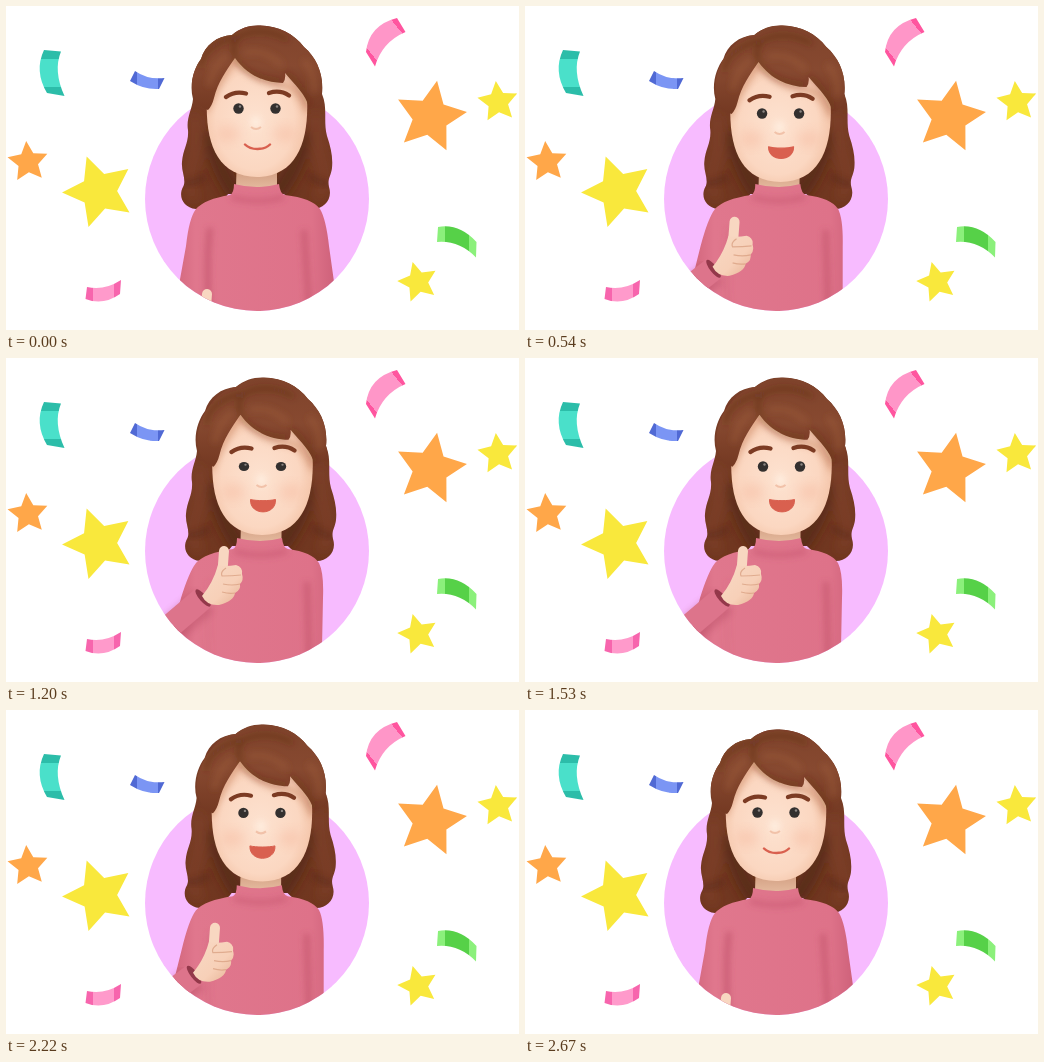
An HTML page for the animation above (2700 ms loop, 513 by 324 pixels).

```html
<!DOCTYPE html>
<html lang="en">
<head>
<meta charset="utf-8">
<title>Thumbs up</title>
<style>
html, body { margin: 0; width: 100%; height: 100%; overflow: hidden; background: #fff; }
svg { display: block; width: 513px; height: 324px; }
</style>
</head>
<body>
<svg viewBox="0 0 513 324" xmlns="http://www.w3.org/2000/svg">
  <defs>
    <clipPath id="disc"><circle cx="251" cy="193" r="112"/></clipPath>
    <filter id="soft" x="-50%" y="-50%" width="200%" height="200%"><feGaussianBlur stdDeviation="3"/></filter>
    <filter id="softer" x="-50%" y="-50%" width="200%" height="200%"><feGaussianBlur stdDeviation="6"/></filter>
    <linearGradient id="hair" x2="0" y2="1">
      <stop stop-color="#7b4029"/><stop offset="1" stop-color="#70361f"/>
    </linearGradient>
    <linearGradient id="fringe" x2="0" y2="1">
      <stop stop-color="#7f432b"/><stop offset=".5" stop-color="#874930"/><stop offset="1" stop-color="#743922"/>
    </linearGradient>
    <radialGradient id="skin" cx=".48" cy=".55" r=".6">
      <stop stop-color="#fde2d0"/><stop offset=".65" stop-color="#fbd7c1"/><stop offset="1" stop-color="#f0bb9c"/>
    </radialGradient>
    <linearGradient id="neckSkin" x2="0" y2="1">
      <stop offset=".3" stop-color="#cf9a7d"/><stop offset="1" stop-color="#e9c0a5"/>
    </linearGradient>
    <linearGradient id="wool" gradientUnits="userSpaceOnUse" x1="170" x2="330">
      <stop stop-color="#d4687f"/><stop offset=".12" stop-color="#e0778d"/>
      <stop offset=".85" stop-color="#de7289"/><stop offset="1" stop-color="#cd6079"/>
    </linearGradient>
    <linearGradient id="palm" x2="1" y2="1">
      <stop stop-color="#f8d9c4"/><stop offset=".6" stop-color="#f7d0b8"/><stop offset="1" stop-color="#e5b092"/>
    </linearGradient>
    <clipPath id="hairClip"><use href="#hairShape"/></clipPath>
    <clipPath id="faceClip"><use href="#faceShape"/></clipPath>
  </defs>

  <g id="confetti"></g>
  <circle cx="251" cy="193" r="112" fill="#f7bbff"/>

  <g id="backHair">
    <path id="hairShape" fill="url(#hair)" d="M254 19.5C273 20 288 28 298 41C311 52 318 69 316 88C322 102 317 115 321 130C325 142 327 151 326 162C325 170 321 173 323 181C327 193 318 203 307 203C296 203 286 196 278 188H222C216 197 202 205 190 203C177 202 172 190 177 181C181 174 175 166 176 156C177 143 183 137 182 124C180 112 186 104 187 93C183 78 188 62 195 53C199 39 211 30 226 29C234 22 244 19 254 19.5Z"/>
    <g clip-path="url(#hairClip)" fill="none">
      <g filter="url(#softer)">
        <path d="M205 125Q212 165 232 190H268Q291 165 298 125" stroke="#4e2214" stroke-width="17" opacity=".65"/>
        <path d="M188 110Q193 135 186 158T190 194M310 108Q309 132 316 156T311 192" stroke="#8f4e33" stroke-width="6" opacity=".6"/>
      </g>
      <path d="M177 177Q190 178 199 170M323 178Q313 178 303 169" stroke="#53261a" stroke-width="5" opacity=".55" filter="url(#soft)"/>
    </g>
  </g>

  <g clip-path="url(#disc)">
    <path id="neck" d="M231 150H271V180Q251 194 230 180Z" fill="url(#neckSkin)"/>
    <path id="body" fill="url(#wool)"/>
    <g fill="none" stroke="#b8485f" stroke-width="5" filter="url(#soft)">
      <path id="leftCrease" d="M204 222Q200 255 203 305"/>
      <path id="rightCrease" opacity=".55"/>
      <path id="collar" d="M225 191Q251 199 278 191" opacity=".4"/>
    </g>
    <path id="armShade" fill="none" stroke="#a94059" stroke-width="29" opacity=".3" filter="url(#soft)"/>
    <path id="forearm" fill="none" stroke="#dd748b" stroke-width="24"/>
    <ellipse id="cuff" rx="3.5" ry="11" fill="#93384a"/>
    <g id="hand">
      <path d="M218 193L216.5 213" stroke="#f8d7c1" stroke-width="10" stroke-linecap="round"/>
      <path d="M212 207Q219 209 230 207Q237 209 236 216Q238 222 234 226Q235 232 229 235Q228 243 213 247Q201 248 196 238Q207 225 212 207Z" fill="url(#palm)"/>
      <path d="M220 210Q214 214 216 218Q226 218 235 217M217 226Q226 228 234 226M216 234Q223 236 229 235" fill="none" stroke="#d99f80" stroke-width="1.2" opacity=".75"/>
    </g>
  </g>

  <g id="face">
    <path id="faceShape" fill="url(#skin)" d="M201 94C199 136 211 171 251 171C290 171 303 136 301 94C298 62 280 47 251 47C222 47 204 62 201 94Z"/>
    <path d="M199 105Q211 76 229 52Q246 76 281 80Q292 82 302 106" clip-path="url(#faceClip)" fill="none" stroke="#c98562" stroke-width="7" opacity=".5" filter="url(#soft)"/>
    <g filter="url(#softer)" fill="#f4ad91" opacity=".35"><ellipse cx="222" cy="128" rx="12" ry="8"/><ellipse cx="279" cy="128" rx="12" ry="8"/></g>
    <ellipse cx="250" cy="116" rx="5" ry="6" fill="#fff0e2" opacity=".8" filter="url(#soft)"/>
    <path d="M245 121Q250 125 255 121" fill="none" stroke="#e9ac8d" stroke-width="2" opacity=".6"/>
    <path id="brows" d="M220 91Q229 84.5 240 87.5M263 87Q274 83.5 283 89.5" fill="none" stroke="#7c3b23" stroke-width="4.2" stroke-linecap="round"/>
    <g id="eyes">
      <g fill="#33302f"><circle cx="232.5" cy="102.5" r="5.2"/><circle cx="269.5" cy="102.5" r="5.2"/></g>
      <g fill="#8b8683"><circle cx="234" cy="100.5" r="1.2"/><circle cx="271" cy="100.5" r="1.2"/></g>
    </g>
    <path id="mouth" fill="#d9604f" stroke="#d9604f" stroke-linejoin="round"/>
  </g>

  <g id="cap" clip-path="url(#hairClip)">
    <g id="fringeGroup">
      <path fill="url(#fringe)" d="M229 52C220 65 212 76 208 92Q206 100 202 104C195 102 188 94 186 82C184 60 199 30 228 22C252 8 286 15 304 45C319 62 318 84 313 95Q309 101 303 101C299 88 291 81 279 67Q280 73 277 77C259 77 241 69 229 52Z"/>
      <g fill="none" filter="url(#soft)">
        <path d="M195 62Q196 39 230 31M229 51Q224 39 234 30Q258 20 282 34" stroke="#55291b" stroke-width="3.5" opacity=".5"/>
        <path d="M238 47Q258 42 276 59M203 80Q207 60 221 49M298 54Q310 69 308 87" stroke="#a0603f" stroke-width="5" opacity=".5"/>
        <path d="M279 66Q293 74 303 99M229 53Q245 73 276 75" stroke="#58291a" stroke-width="3" opacity=".45"/>
      </g>
    </g>
  </g>
</svg>
<script>
const $ = id => document.getElementById(id);
const set = (id, name, value) => $(id).setAttribute(name, value);
const LOOP = 2700, STEP = 30;
let scenery = "";

function star(x, y, r, tilt, fill) {
  let points = "";
  for (let i = 0; i < 10; i++) {
    const a = (tilt + i * 36) * Math.PI / 180, d = i % 2 ? r * 0.49 : r;
    points += `${x + d * Math.sin(a)},${y - d * Math.cos(a)} `;
  }
  scenery += `<polygon points="${points}" fill="${fill}"/>`;
}

// A curved strip whose two ends carry a second colour.
function ribbon(id, axis, d, middle, ends) {
  const stop = (offset, color) => `<stop offset="${offset}" stop-color="${color}"/>`;
  scenery += `<linearGradient id="${id}" ${axis}>`
    + stop(0.2, ends) + stop(0.2, middle) + stop(0.8, middle) + stop(0.8, ends)
    + `</linearGradient><path d="${d}" fill="url(#${id})"/>`;
}

const across = 'x2="1" y2="0"', down = 'x2="0" y2="1"', slant = 'x1="1" x2="0" y2="1"';
star(424.5, 111, 36.8, 10.3, "#ffa749");
star(492, 96, 21, -6, "#f9e83c");
star(22, 156, 21, -5, "#ffa749");
star(93, 185.5, 37, -19.5, "#f9e83c");
star(412, 276, 20.8, -15, "#f9e83c");
ribbon("teal", down, "M38 44L55 45.5Q47 65 58.5 90L41 87Q28 65 38 44Z", "#4ae0ca", "#2cbda9");
ribbon("blue", across, "M129 65Q142 74 158.5 72L153 83Q138 84 124 75Z", "#7b95f4", "#5069d4");
ribbon("rose", slant, "M391 12Q363 19 360 46L369 60.5Q376 36 399.5 26Z", "#ff96c8", "#ff559f");
ribbon("pink", across, "M81 281Q98 285 115 274L114 288Q97 300 79.5 293Z", "#ff9acb", "#f765ad");
ribbon("green", across, "M432 221Q453 217 470.5 236L470 251.5Q453 234 431 236Z", "#56d148", "#8bf07b");
$("confetti").innerHTML = scenery;

// Each track holds one value per key time.
const keys = [0, 240, 400, 540, 690, 2100, 2220, 2310, 2460, 2610, LOOP];
const tracks = {
  lean: [0, .1, .42, .83, 1, 1, .9, .6, .15, 0, 0],
  swing: [0, .35, .65, .88, 1, 1, .88, .65, .25, 0, 0],
  reach: [0, .13, .43, .76, 1, 1, .74, .43, .1, 0, 0],
  hop: [0, 0, 0, 0, 0, 0, -5, -7, -2, 0, 0]
};

const clamp = v => Math.min(1, Math.max(0, v));
const smooth = v => v * v * (3 - 2 * v);

// Monotone cubic through the keys, so no part overshoots.
function valueAt(track, time) {
  const slope = k => k in track && k + 1 in track ? (track[k + 1] - track[k]) / (keys[k + 1] - keys[k]) : 0;
  const tangent = k => {
    const a = slope(k - 1), b = slope(k);
    return a * b <= 0 ? 0 : 2 * a * b / (a + b);
  };
  let k = 0;
  while (time >= keys[k + 1]) k++;
  const span = keys[k + 1] - keys[k], u = (time - keys[k]) / span, w = 1 - u;
  return track[k] + (track[k + 1] - track[k]) * smooth(u)
    + span * u * w * (w * tangent(k) - u * tangent(k + 1));
}

const eyeOpen = time =>
  1 - 0.86 * smooth(clamp((time - 1170) / 120) - clamp((time - 1380) / 150));

function draw(time) {
  const [lean, swing, reach, hop] = Object.values(tracks).map(t => valueAt(t, time));
  const smile = clamp((lean - 0.1) / 0.8);
  const mix = (a, b) => a + (b - a) * smile;
  const move = (id, x, y) => set(id, "transform", `translate(${x} ${y})`);

  const headX = 4 * lean, faceX = 1.5 * lean, faceY = 6 * lean;
  const bodyX = 3 * lean - 4 * (swing - lean), bodyY = 2 * reach ** 6 + hop * 0.5 - swing * (1 - reach) * 2;
  move("backHair", headX, hop);
  move("cap", headX, hop);
  move("fringeGroup", faceX, faceY * 0.8);
  move("face", headX + faceX, hop + faceY);
  move("neck", bodyX + faceX, bodyY);
  move("collar", bodyX, bodyY);
  move("brows", 0, -3 * lean ** 3);
  set("eyes", "transform", `translate(0 102.5) scale(1 ${eyeOpen(time)}) translate(0 -102.5)`);

  const corner = mix(138.5, 135.5), lip = mix(144.5, 137), jaw = mix(144.5, 152);
  set("mouth", "d", `M239 ${corner}C245 ${lip} 258 ${lip} 264 ${corner}C${mix(258, 265)} ${jaw} ${mix(245, 238)} ${jaw} 239 ${corner}Z`);
  set("mouth", "stroke-width", mix(2.4, 1));

  const x = v => v + bodyX, y = v => v + bodyY;
  const left = 171 - 9 * swing, right = 330 - 14 * swing;
  const shoulders = `Q${x(274)} ${y(188)} ${x(279)} ${y(189)}Q306 ${y(192)} ${314 - swing} ${y(203)}Q${320 - 2 * swing} ${y(213)} ${323 - 6 * swing} 240`;
  const neckline = `M${x(228)} ${y(178)}Q${x(251)} ${y(184)} ${x(273)} ${y(178)}`;
  const sleeve = `L${180 - 5 * swing} 240Q183 ${y(212)} 190 ${y(203)}Q199 ${y(193)} ${x(224)} ${y(189)}Q${x(228)} ${y(187)} ${x(228)} ${y(178)}Z`;
  set("body", "d", `${neckline}${shoulders}L${right} 290V324H${left}V290${sleeve}`);
  set("leftCrease", "opacity", 0.6 - 0.5 * swing);
  set("rightCrease", "d", `M${298 + 3 * swing} 224Q${300 + 2 * swing} 255 303 300`);

  const wristX = 180 + 17 * reach ** 2.5, wristY = 335 - 95 * reach;
  const elbowX = 180 - 18 * clamp(reach * 1.4), elbowY = 312 - 42 * reach ** 1.4;
  const arm = `M${elbowX} ${elbowY}L${wristX} ${wristY}`;
  const angle = Math.atan2(wristY - elbowY, wristX - elbowX) * 180 / Math.PI;
  set("forearm", "d", arm);
  set("armShade", "d", arm);
  move("armShade", 1, 3);
  set("cuff", "transform", `translate(${wristX} ${wristY}) rotate(${angle})`);
  move("hand", wristX - 197, wristY - 240);
}

const start = performance.now();
function tick() {
  const time = (performance.now() - start) % LOOP;
  draw(Math.floor(time / STEP) * STEP);
  requestAnimationFrame(tick);
}
draw(0);
requestAnimationFrame(tick);
</script>
</body>
</html>
```
